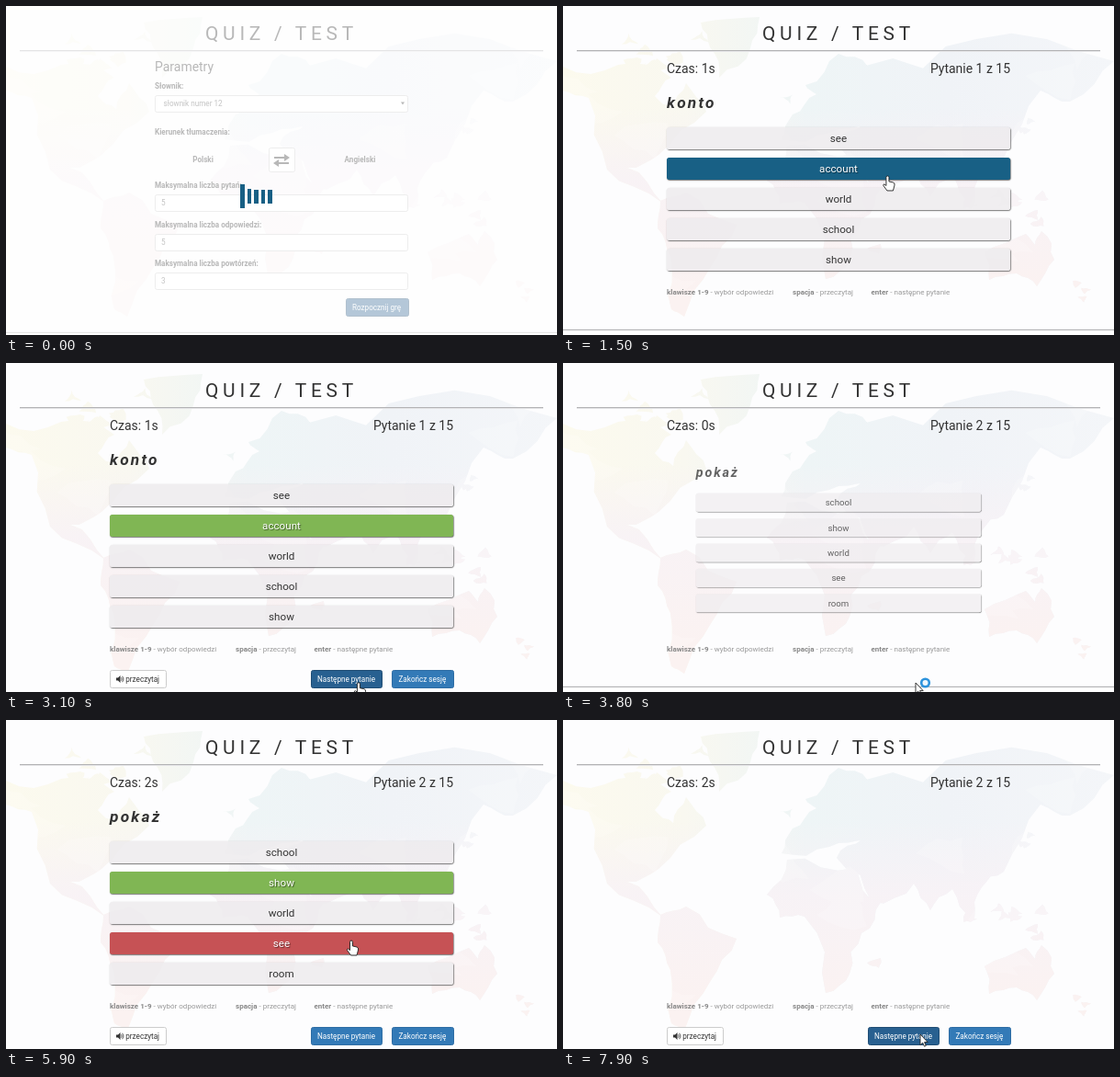
These frames come from a looping animation (600 by 358 pixels, 8 s). An HTML page:

```html
<!DOCTYPE html>
<html lang="pl">
<head>
<meta charset="utf-8">
<title>Quiz</title>
<style>
html, body { margin: 0; width: 100%; height: 100%; overflow: hidden; background: #fdfdfe; }
#stage { position: absolute; left: 0; top: 0; width: 600px; height: 358px; overflow: hidden;
  font-family: Roboto, Arial, sans-serif; color: #333; }
#stage div { position: absolute; box-sizing: border-box; }
svg { position: absolute; left: 0; top: 0; overflow: visible; }
.full { left: 0; top: 0; width: 600px; height: 358px; }
.text { line-height: 20px; white-space: pre; }
.hint { color: #999; }
.hint b { color: #888; }
#zoom { transform-origin: 300px 190px; }
.item { left: 113px; width: 374px; height: 24px; line-height: 24px; border-radius: 2.5px;
  font-size: 11.64px; text-align: center; box-shadow: .6px .8px 1.2px #555; }
.btn { border: 1px solid #ccc; border-radius: 2.5px; background: #fff; }
.blue { border-color: #2e6da4; background: #337ab7; }
.dark { border-color: #204d74; background: #286090; }
.field { left: 162px; width: 276px; height: 19px; border: 1px solid #ccc; border-radius: 2.5px; background: #fff; }
#rule { left: 15px; top: 48px; width: 570px; height: 1px; background: #b2b2b4; box-shadow: 0 1px #e6e6e8; }
#foot { left: 0; top: 352px; width: 600px; height: 6px; background: #fff;
  border-top: 1px solid #b4b4b6; box-shadow: 0 0 2px #ccc; }
.veil { background: #fff; opacity: .65; }
.bar { width: 4.5px; background: #186085; }
</style>
</head>
<body>
<div id="stage">
  <svg width="600" height="358">
    <defs>
      <linearGradient id="across">
        <stop offset="0" stop-color="#fcfaee"/><stop offset=".22" stop-color="#f9f8f0"/>
        <stop offset=".44" stop-color="#eef5f6"/><stop offset=".7" stop-color="#f0f3f7"/>
        <stop offset="1" stop-color="#f4f6f9"/>
      </linearGradient>
      <linearGradient id="down" gradientUnits="userSpaceOnUse" x1="0" y1="110" x2="0" y2="310">
        <stop offset="0" stop-color="#f8f1f6" stop-opacity="0"/>
        <stop offset=".4" stop-color="#f8f2f6" stop-opacity=".9"/>
        <stop offset="1" stop-color="#fbf2f1"/>
      </linearGradient>
      <clipPath id="land"><path id="shape"/></clipPath>
    </defs>
    <g clip-path="url(#land)">
      <rect width="600" height="358" fill="url(#across)"/>
      <rect width="600" height="358" fill="url(#down)"/>
      <path id="facets" fill="#fff" opacity=".14"/>
    </g>
  </svg>
  <div id="rule"></div>
  <div id="foot"></div>
  <div id="form" class="full"></div>
  <div id="quiz" class="full">
    <div id="zoom" class="full"></div>
    <div id="actions" class="full"></div>
  </div>
  <div id="cover" class="full"><div class="full veil"></div></div>
  <svg id="cursor" width="20" height="20" fill="#fff" stroke="#222" stroke-width=".9" stroke-linejoin="round">
    <path id="hand" d="M-1.5 1.5Q-1.5 0 0 0T1.5 1.5V6L6 7Q8 7.5 7.6 10L6 16H-.5L-4.5 10.5Q-5 9 -3.5 9L-1.5 10.5Z"/>
    <path id="arrow" d="M0 0V11.6L2.7 9.2 4.5 13.2 6.3 12.4 4.6 8.6H8.2Z"/>
    <circle id="busy" cx="10.5" cy="0" r="4.3" fill="#eef7fd" stroke="#2d93dc" stroke-width="2.6"/>
  </svg>
</div>
<script>
const $ = id => document.getElementById(id);
const clamp = v => Math.max(0, Math.min(1, v));
const show = (el, on) => { el.style.display = on ? '' : 'none'; };

let seed = 7;
const rand = () => (seed = seed * 16807 % 2147483647) / 2147483647;

// Joins key points, then splits each edge twice with a random sideways shift
function coast(points) {
  for (let round = 0; round < 2; round++) {
    points = points.flatMap(([x, y], i) => {
      const [u, v] = points[(i + 1) % points.length], d = (rand() - .5) * .3;
      return [[x, y], [(x + u) / 2 + (v - y) * d, (y + v) / 2 - (u - x) * d]];
    });
  }
  return `M${points.join('L')}Z`;
}
const outline = keys => coast(keys.split(' ').map(p => p.split(',').map(Number)));

// Random triangles of radius r inside a box
function scatter(n, x, y, w, h, r) {
  return Array.from({ length: n }, () => {
    const cx = x + rand() * w, cy = y + rand() * h, turn = rand() * 7;
    return coast([0, 2, 4].map(a => [cx + r * Math.cos(a + turn), cy + r * .7 * Math.sin(a + turn)]));
  }).join('');
}

const northAmerica = '0,66 60,64 118,78 100,98 120,112 134,84 156,115 104,162 70,176 108,214 48,178 28,100 0,92';
const greenland = '150,18 214,12 204,46 170,78 160,45';
const southAmerica = '106,212 134,203 189,238 160,285 132,338 118,330 117,272 103,242';
const africa = '244,152 318,161 332,192 346,198 325,232 312,276 286,297 263,214 236,215 222,190';
const europe = '238,145 250,118 276,96 264,86 300,52 332,66 332,132 290,138';
const asia = '326,66 450,36 600,60 552,104 520,92 480,165 456,182 448,216 424,184 400,207 382,178 336,198 298,150 326,130';
const australia = '459,268 504,248 514,260 521,245 535,276 516,305 494,291 464,298';
$('shape').setAttribute('d',
  [northAmerica, greenland, southAmerica, africa, europe, asia, australia].map(outline).join('') +
  scatter(9, 70, 32, 80, 38, 11) + scatter(8, 435, 205, 95, 38, 9) + scatter(1, 340, 264, 0, 0, 9) +
  scatter(1, 244, 101, 0, 0, 9) + scatter(3, 500, 116, 14, 22, 6) + scatter(3, 555, 302, 20, 22, 6));
$('facets').setAttribute('d', scatter(30, 0, 30, 600, 280, 34));

function add(parent, cls, html = '', css = {}) {
  const el = document.createElement('div');
  el.className = cls;
  el.innerHTML = html;
  for (const k in css) el.style[k] = typeof css[k] === 'number' && k !== 'fontWeight' ? css[k] + 'px' : css[k];
  parent.appendChild(el);
  return el;
}
// x and baseline place the text; 0.3415em lies between line middle and baseline
function text(parent, str, x, base, size, css = {}) {
  return add(parent, 'text ' + (css.cls || ''), str, { left: x, top: base - size * .3415 - 10, fontSize: size, ...css });
}
const bold = { fontWeight: 700 };
const centred = { width: 100, textAlign: 'center' };
const white = { color: '#fff' };
const small = 8.15, large = 13.97;
const box = (parent, cls, left, top, width, height) => add(parent, cls, '', { left, top, width, height });

const stage = $('stage'), form = $('form'), quiz = $('quiz'), zoom = $('zoom'), actions = $('actions'), cover = $('cover');

stage.insertBefore(text(stage, 'QUIZ / TEST', 217, 37, 20.95, { letterSpacing: 4.7 }), form);

// Settings form
function field(label, value, y, indent) {
  text(form, label, 162, y - 7, small, bold);
  add(form, 'field', '', { top: y });
  text(form, value, 162 + indent, y + 12, small, { color: '#555' });
}
text(form, 'Parametry', 162, 71, large);
field('Słownik:', 'słownik numer 12', 97, 9.5);
text(form, 'Kierunek tłumaczenia:', 162, 140, small, bold);
['pytań:5', 'odpowiedzi:5', 'powtórzeń:3'].forEach((s, i) =>
  field('Maksymalna liczba ' + s.slice(0, -1), s.slice(-1), 205 + 42.6 * i, 7));
text(form, 'Polski', 164.5, 170, small, { ...bold, ...centred });
text(form, 'Angielski', 335.5, 170, small, { ...bold, ...centred });
box(form, 'btn', 286, 154, 29, 27);
add(form, 'full', `<svg width="600" height="358" fill="#333">
  <path d="M292 164H303V161L309 165 303 169V166H292ZM308 170H297V167L291 171 297 175V172H308Z"/>
  <path d="M430 104.5H434L432 107.5Z"/></svg>`);
box(form, 'btn dark', 370, 318, 69, 20);
text(form, 'Rozpocznij grę', 377, 331, small, white);

// Quiz page
const clock = text(quiz, '', 113, 73, large);
const count = text(quiz, '', 387, 73, large, { ...centred, textAlign: 'right' });
[['klawisze 1-9', 'wybór odpowiedzi', 113], ['spacja', 'przeczytaj', 250], ['enter', 'następne pytanie', 335.5]]
  .forEach(([key, what, x]) => text(quiz, `<b>${key}</b> - ${what}`, x, 315, small * .985, { cls: 'hint' }));
const word = text(zoom, '', 113, 111, 17.3, { ...bold, fontStyle: 'italic', letterSpacing: 2.2 });
const rowTop = i => 131.8 + 33.1 * i;
const items = [0, 1, 2, 3, 4].map(i => add(zoom, 'item', '', { top: rowTop(i) }));

function button(label, x, width, indent, cls, css) {
  const el = box(actions, 'btn ' + cls, x, 334, width, 20);
  text(actions, label, x + indent, 347, small, css);
  return el;
}
button('przeczytaj', 113, 62, 17.3, '');
const next = button('Następne pytanie', 332, 78, 7, 'blue', white);
button('Zakończ sesję', 420, 68, 7.5, 'blue', white);
add(actions, 'full', `<svg width="600" height="358" fill="#333"><path d="M120 342.5H122L124.5 340V348L122 345.5H120Z"/>
  <path d="M125.5 342.3Q126.9 344 125.5 345.7M126.7 340.8Q129.3 344 126.7 347.2" fill="none" stroke="#333" stroke-width=".8"/></svg>`);

const bars = items.map((_, i) => add(cover, 'bar', '', { left: 255 + i * 7.6 }));

const questions = [
  { word: 'konto', words: ['see', 'account', 'world', 'school', 'show'], right: 1, pick: 1,
    start: 200, enter: 50, answer: 2050, leave: 3250 },
  { word: 'pokaż', words: ['school', 'show', 'world', 'see', 'room'], right: 1, pick: 3,
    start: 3600, enter: 3620, answer: 5650, leave: 7500 }
];
const plain = [238, 236, 238, .88], blue = [24, 96, 133, 1], green = [128, 182, 84, 1], red = [198, 82, 85, 1];
const mix = (a, b, k) => `rgba(${a.map((v, i) => v + (b[i] - v) * k)})`;

// Pointer trips: start, end, x, y
const trips = [[1200, 1560, 352, 179], [2320, 3120, 384, 348], [4820, 5260, 376, 240], [6320, 7080, 389, 342]];
function pointer(t) {
  let x = 372, y = 262;
  for (const [a, b, tx, ty] of trips) {
    const u = clamp((t - a) / (b - a)), k = u * u * (3 - 2 * u);
    x += (tx - x) * k;
    y += (ty - y) * k;
  }
  return [x, y];
}

function render(t) {
  const started = t >= 100, n = t < 3600 ? 0 : 1, q = questions[n];
  const done = t >= q.answer, fade = clamp((t - q.answer) / 200);
  const [x, y] = pointer(t);
  const s = 1 - (1 - clamp((t - q.enter) / 400)) ** 2.35 - clamp((t - q.leave) / 340) ** 1.6;

  show(form, !started);
  show(quiz, started);
  $('foot').style.top = (started ? 352 : 355) + 'px';
  show($('foot'), !done);
  cover.style.opacity = 1 - clamp((t - 100) / 250);
  bars.forEach((bar, i) => {
    const h = 15 + 11 * clamp(1 - Math.abs(t / 100 - i));
    bar.style.height = h + 'px';
    bar.style.top = 207 - h / 2 + 'px';
  });

  const seconds = Math.floor((Math.min(t, q.answer) - q.start) / 1000);
  clock.textContent = `Czas: ${Math.max(0, seconds)}s`;
  count.textContent = `Pytanie ${n + 1} z 15`;
  word.textContent = q.word;
  zoom.style.opacity = s;
  zoom.style.transform = s < 1 ? `scale(${.3 + .7 * s})` : 'none';

  let over = false;
  items.forEach((el, i) => {
    const hit = t >= 1200 && s === 1 && y >= rowTop(i) && y <= rowTop(i) + 24;
    over = over || hit;
    let from = hit && !done ? blue : plain, to = from, k = 0;
    if (done && i === q.pick) { from = blue; to = i === q.right ? green : red; k = fade; }
    else if (done && i === q.right) { to = green; k = 1; }
    const lit = from === blue || to !== from;
    el.textContent = q.words[i];
    el.style.background = mix(from, to, k);
    el.style.color = lit ? '#fff' : '#333';
    el.style.textShadow = lit ? '1px 1px 1px rgba(0,0,0,.5)' : 'none';
  });

  actions.style.opacity = fade;
  const onNext = done && x >= 332 && x <= 410 && y >= 334;
  next.className = 'btn ' + (onNext ? 'dark' : 'blue');

  const hand = over || onNext && t < q.leave + 250;
  show($('cursor'), t >= 1200);
  $('cursor').style.transform = `translate(${x}px,${y}px)`;
  show($('hand'), hand);
  show($('arrow'), !hand);
  show($('busy'), t >= 3600 && t < 4100);
}

const begin = performance.now();
function frame() {
  render((performance.now() - begin) % 8000);
  requestAnimationFrame(frame);
}
frame();
</script>
</body>
</html>
```
